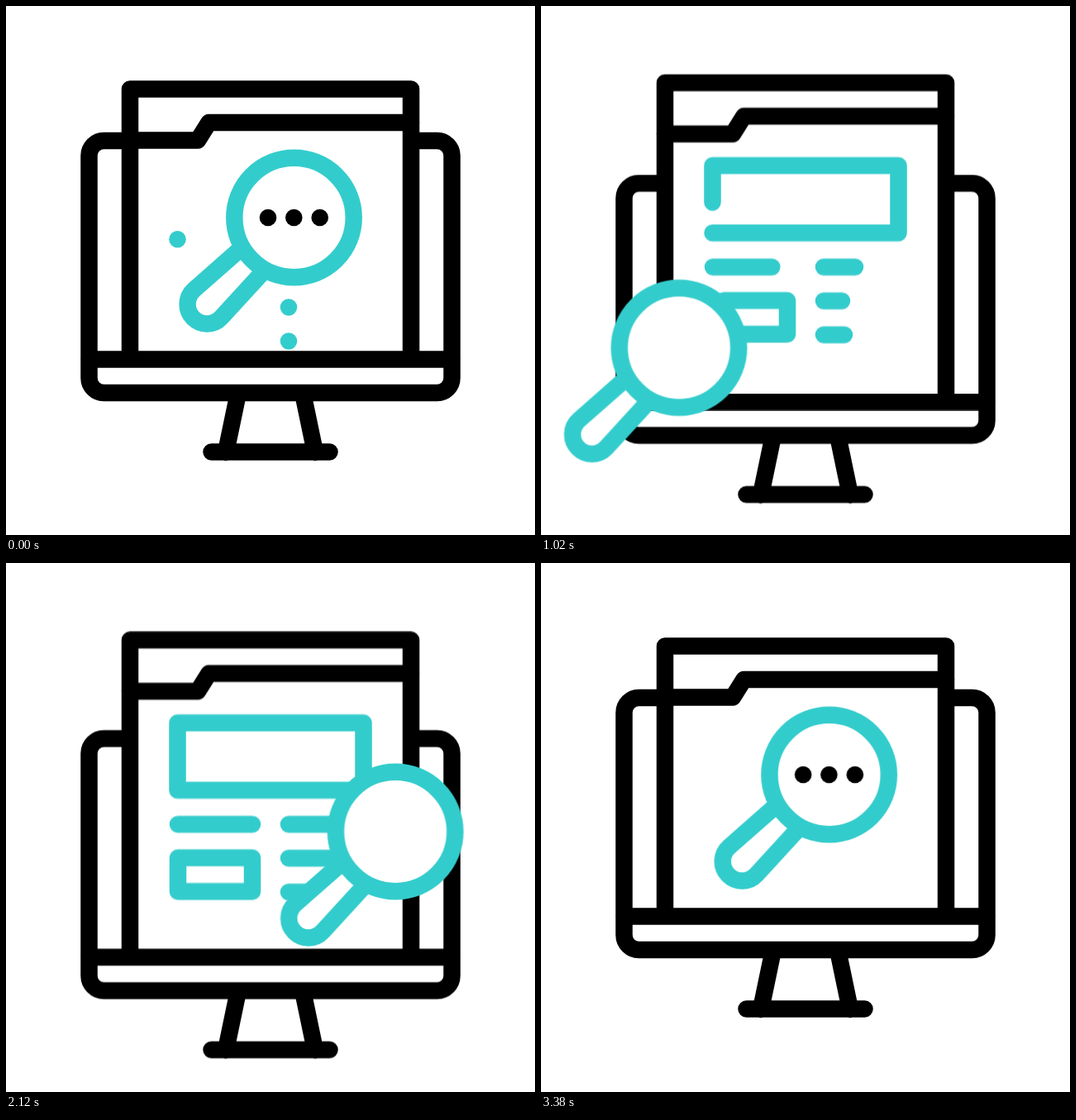
An HTML page without scripts that plays this animation: 640 by 640 pixels, repeating every 3.6 s.

```html
<!DOCTYPE html>
<html lang="en">
<head>
<meta charset="utf-8">
<title>Folder search</title>
<style>
  html, body { margin: 0; width: 100%; height: 100%; overflow: hidden; background: #fff; }
  svg { display: block; width: 100%; height: 100%; }

  .ink, .teal { fill: none; stroke: #000; stroke-width: 20.5; stroke-linecap: round; stroke-linejoin: round; }
  .teal { stroke: #3cc; }
  .paper { fill: #fff; }

  .monitor, .folder, .glass, .trim, .bar, .dot {
    --smooth: cubic-bezier(.333, 0, .667, 1);
    animation: 3.6s var(--smooth) infinite;
  }
  .monitor { animation-name: sink; }
  .folder { animation-name: rise; }
  .glass { animation-name: scan; }
  .trim { stroke-dasharray: 1 2; animation-name: trim; }
  .trim.late { animation-name: trim-late; }
  .bar { stroke-dasharray: 90 300; }
  .bar.a { animation-name: bar-a; }
  .bar.b { animation-name: bar-b; }
  .bar.c { animation-name: bar-c; }
  .dot { animation-timing-function: step-end; }
  .dot.a { animation-name: dot-a; }
  .dot.b { animation-name: dot-b; }
  .dot.c { animation-name: dot-c; }

  @keyframes sink {
    0%, 83.33%, 100% { transform: none; }
    22.22%, 55.56% { transform: translateY(51.5px); }
  }
  /* relative to the monitor, so the folder climbs while the screen sinks */
  @keyframes rise {
    0%, 83.33%, 100% { transform: none; }
    22.22%, 55.56% { transform: translateY(-59.2px); }
  }
  @keyframes scan {
    0% { transform: translate(0, 0); animation-timing-function: cubic-bezier(.333, 0, .37, 1); }
    27.78%, 28.89% { transform: translate(-181.5px, 157.5px); }
    57.78%, 66.67% { transform: translate(122.6px, 69px); }
    94.44%, 100% { transform: translate(0, 0); }
  }
  @keyframes trim {
    0%, 91.67%, 100% { stroke-dashoffset: 1; visibility: hidden; }
    33.33%, 66.67% { stroke-dashoffset: 0; visibility: visible; }
  }
  @keyframes trim-late {
    0%, 8.33%, 91.67%, 100% { stroke-dashoffset: 1; visibility: hidden; }
    36.67%, 66.67% { stroke-dashoffset: 0; visibility: visible; }
  }
  @keyframes bar-a {
    0%, 91.67%, 100% { stroke-dashoffset: 90; visibility: hidden; }
    11.67% { stroke-dashoffset: 69; visibility: visible; }
    28.33% { stroke-dashoffset: 52; visibility: visible; }
    41.11%, 66.67% { stroke-dashoffset: 0; visibility: visible; }
  }
  @keyframes bar-b {
    0%, 91.67%, 100% { stroke-dashoffset: 90; visibility: hidden; }
    11.67% { stroke-dashoffset: 64; visibility: visible; }
    28.33% { stroke-dashoffset: 68; visibility: visible; }
    41.11%, 66.67% { stroke-dashoffset: 14; visibility: visible; }
  }
  @keyframes bar-c {
    0%, 91.67%, 100% { stroke-dashoffset: 90; visibility: hidden; }
    11.67% { stroke-dashoffset: 77; visibility: visible; }
    28.33% { stroke-dashoffset: 65; visibility: visible; }
    41.11%, 66.67% { stroke-dashoffset: 71; visibility: visible; }
  }
  @keyframes dot-a { 0%, 66.5% { opacity: 1; } 13.5% { opacity: 0; } }
  @keyframes dot-b { 0%, 68.5% { opacity: 1; } 9% { opacity: 0; } }
  @keyframes dot-c { 0%, 70.5% { opacity: 1; } 4.5% { opacity: 0; } }
</style>
</head>
<body>
<svg viewBox="0 0 640 640">
  <clipPath id="screen"><path d="M0-100H640V427H0z"/></clipPath>

  <g class="monitor">
    <g class="ink">
      <path d="M281 468L266 540M359 468L374 540M248.5 539.5H391.5"/>
      <rect class="paper" x="100.5" y="163" width="439" height="305" rx="18"/>
    </g>
    <g clip-path="url(#screen)">
      <g class="folder">
        <path class="ink paper" d="M150 490V100.5H490V490"/>
        <path class="ink" d="M150 162.5H232L245.5 141H490"/>
        <g class="teal">
          <path class="trim" pathLength="1" d="M207.5 282.2H432.5V200.7H207.5V282.2"/>
          <path class="trim late" pathLength="1" d="M208 323.4H298"/>
          <path class="trim late" pathLength="1" d="M208 404.8H298V364H208V404.8"/>
          <path class="bar a" d="M342 323.4H432"/>
          <path class="bar b" d="M342 364.4H432"/>
          <path class="bar c" d="M342 405.4H432"/>
        </g>
      </g>
    </g>
    <path class="ink" d="M101 427.5H539"/>
  </g>

  <g class="glass">
    <path class="teal paper" d="M290 288.2L227.4 343.4A23.5 23.5 0 1 0 260.3 376.9L313 319.5"/>
    <circle class="teal paper" cx="348.5" cy="256" r="72.2"/>
    <circle class="dot a" cx="317" cy="256" r="10.3"/>
    <circle class="dot b" cx="348.3" cy="256" r="10.3"/>
    <circle class="dot c" cx="379.7" cy="256" r="10.3"/>
  </g>
</svg>
</body>
</html>
```
